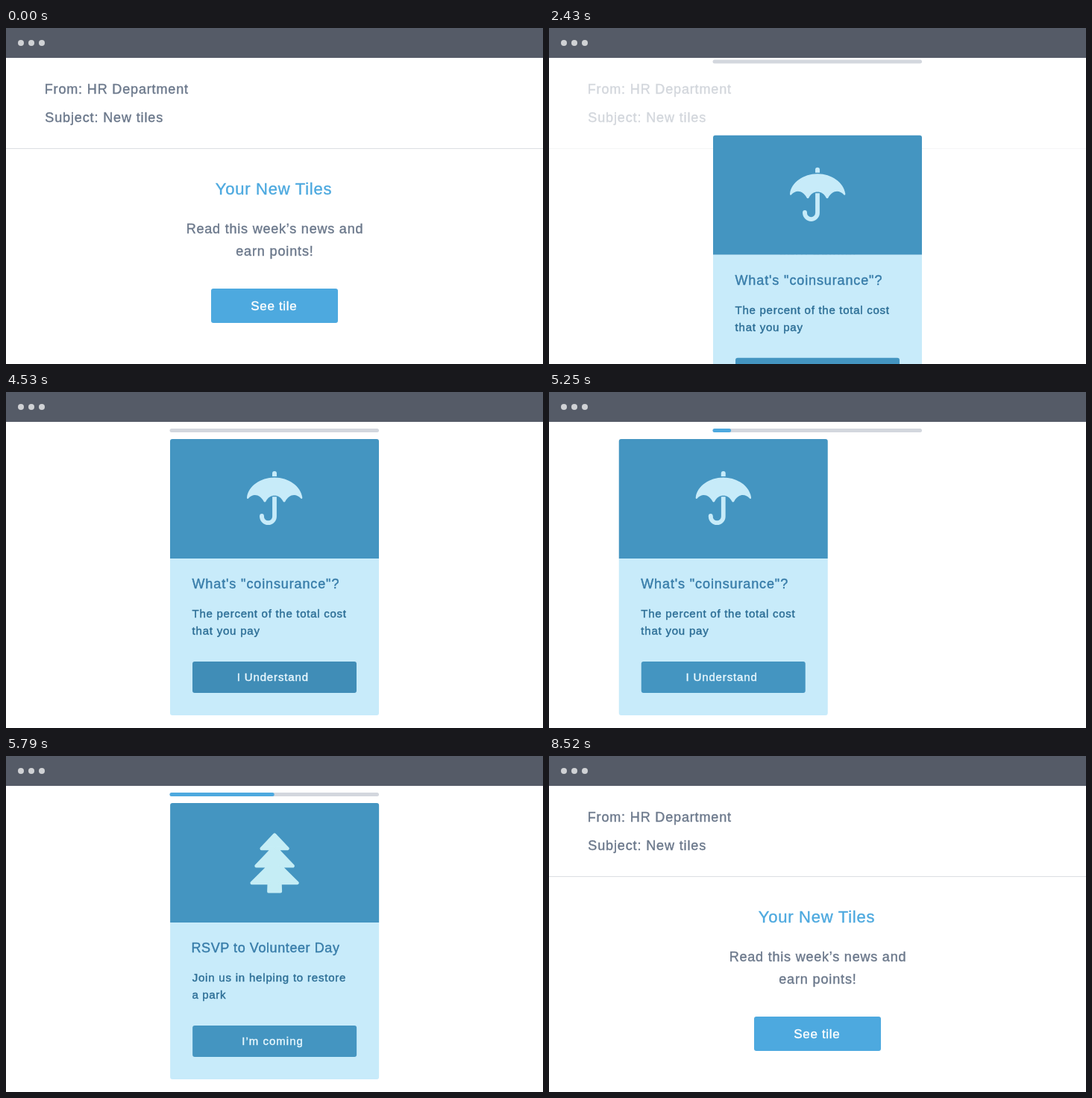
Animation of 720x450 px, one loop 8580 ms. Source, as an HTML page:

```html
<!DOCTYPE html>
<html lang="en">
<head>
<meta charset="utf-8">
<title>New tiles</title>
<style>
  html, body { margin: 0; width: 100%; height: 100%; overflow: hidden; background: #fff; }
  svg { display: block; width: 720px; height: 450px; }
  text {
    font-family: "Liberation Sans", Arial, Helvetica, sans-serif;
    stroke-width: .4px;
    white-space: pre;
  }
  .slate { fill: #6b788b; stroke: #6b788b; }
  .sky { fill: #4da9df; stroke: #4da9df; }
  .white { fill: #fff; stroke: #fff; }
  .head { fill: #377ca9; stroke: #377ca9; }
  .body { fill: #2b6d95; stroke: #2b6d95; }
  .ice { fill: #e9f8fe; stroke: #e9f8fe; }
</style>
</head>
<body>
<svg id="stage" viewBox="0 0 720 450"></svg>
<script>
const LOOP = 8580;
const label = (cls, size, x, y, gap, str) =>
  `<text class="${cls}" x="${x}" y="${y}" font-size="${size}" letter-spacing="${gap}">${str}</text>`;

const umbrella = `<g fill="#c7ebf9">
  <path d="M357 113V109a3 3 0 0 1 6 0V113Z"/>
  <path d="M323 141C325 126 341 114.5 360 114.5S395 126 397.3 141Q397.5 144 395.3 142.5
    C389 135 379 137 374.5 146.5Q373 148.5 371.5 146.5C367 136 353 136 348.5 146.5
    Q347 148.5 345.5 146.5C341 137 331 135 325 142.5Q322.7 144 323 141Z"/>
  <path d="M360 140.3V166.7a8.5 8.5 0 0 1-17 0V166" fill="none" stroke="#c7ebf9" stroke-width="5.8"/>
  <circle cx="343" cy="166" r="2.9"/></g>`;

const tree = `<path fill="#c5edf5" stroke="#c5edf5" stroke-width="4.4" stroke-linejoin="round"
  d="M360 105.5L377.5 124H362.4L384.6 147.3H367.5L390.5 170H367.4L367.8 181.4H352.2L352.6 170
  H329.5L352.5 147.3H335.4L357.6 124H342.5Z"/>`;

const card = (id, icon, title, lines, action) => `<g id="${id}">
  <path fill="#4495c1" d="M220 223V66a3 3 0 0 1 3-3H497a3 3 0 0 1 3 3V223Z"/>
  <path fill="#c8ebfa" d="M220 223H500V430a3 3 0 0 1-3 3H223a3 3 0 0 1-3-3Z"/>
  ${icon}${title}${lines.join("")}
  <rect class="btn" x="250" y="361" width="220" height="42" rx="3" fill="#4495c1"/>
  ${action}</g>`;

const stage = document.getElementById("stage");
stage.innerHTML = `
  <g id="mail">
    ${label("slate", 18, 51.7, 88, .85, "From: HR Department")}
    ${label("slate", 18, 52.3, 126, .87, "Subject: New tiles")}
    <rect y="161" width="720" height="1" fill="#dcdfe3"/>
    ${label("sky", 22, 280.8, 223, .75, "Your New Tiles")}
    ${label("slate", 18, 241.7, 275, .79, "Read this week’s news and")}
    ${label("slate", 18, 308.2, 305, .87, "earn points!")}
    <rect id="open" x="275" y="349" width="170" height="46" rx="3" fill="#4da9df"/>
    ${label("white", 17, 328.3, 378, .67, "See tile")}
  </g>
  <g id="bar">
    <rect x="219.5" y="49" width="280.5" height="5" rx="2.5" fill="#d3d7de"/>
    <rect id="done" x="219.5" y="49" width="0" height="5" rx="2.5" fill="#4da9df"/>
  </g>
  ${card("first", umbrella,
    label("head", 18, 249.5, 263, .88, `What's "coinsurance"?`),
    [label("body", 15, 249.6, 302, .73, "The percent of the total cost"),
     label("body", 15, 249.6, 325, .78, "that you pay")],
    label("ice", 15, 309.7, 387, .86, "I Understand"))}
  ${card("second", tree,
    label("head", 18, 248.4, 263, .58, "RSVP to Volunteer Day"),
    [label("body", 15, 249.5, 302, .8, "Join us in helping to restore"),
     label("body", 15, 249.3, 325, .66, "a park")],
    label("ice", 15, 316.1, 387, 1.02, "I’m coming"))}
  <rect width="720" height="40" fill="#555b67"/>
  ${[20, 34, 48].map(x => `<circle cx="${x}" cy="20" r="4" fill="#d0d2d5"/>`).join("")}`;

const el = id => document.getElementById(id);
const mail = el("mail"), bar = el("bar"), done = el("done");
const first = el("first"), second = el("second");
const openBtn = el("open"), okBtn = first.querySelector(".btn");
const fading = [...second.children, ...bar.children];

const span = (t, a, b) => Math.min(1, Math.max(0, (t - a) / (b - a)));
const inOut = p => p < .5 ? 4 * p ** 3 : 1 - 4 * (1 - p) ** 3;
const place = (node, x, y) => node.setAttribute("transform", `translate(${x} ${y})`);

function press(node, rgb, t, at) {
  const k = 1 - .2 * (span(t, at, at + 120) - span(t, at + 180, at + 270));
  node.setAttribute("fill", `rgb(${rgb.map(c => Math.round(c * k))})`);
}

function draw(t) {
  press(openBtn, [77, 169, 223], t, 1800);
  press(okBtn, [68, 149, 193], t, 4500);

  const rise = (1 - span(t, 2163, 2822)) ** 3;
  const away = (1 - span(t, 2160, 2670)) ** 1.6;
  const slide = inOut(span(t, 4940, 5822));
  const reset = span(t, 7830, 8520);

  place(first, -720 * slide, 387 * rise);
  place(second, 720 * (1 - slide), 0);
  place(bar, 0, -21.6 * away);
  done.setAttribute("width", 140.2 * slide);

  mail.setAttribute("opacity", Math.max(away, reset));
  for (const part of fading) part.setAttribute("opacity", 1 - reset);
}

const start = performance.now();
function tick() {
  draw((performance.now() - start) % LOOP);
  requestAnimationFrame(tick);
}
draw(0);
requestAnimationFrame(tick);
</script>
</body>
</html>
```
